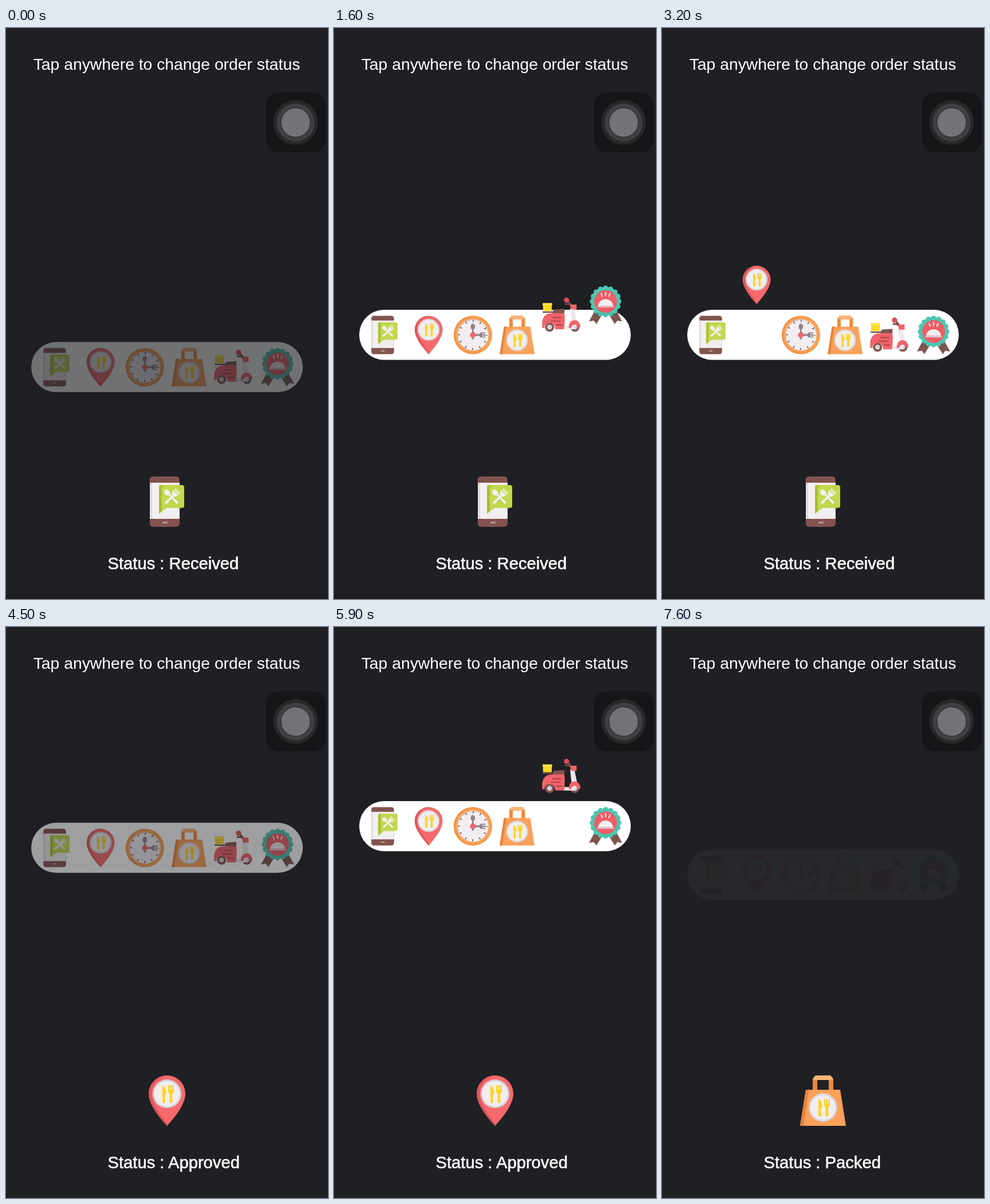
Write an HTML page that moves like this. It is 562 px wide and 997 px high and loops after 8 s.

```html
<!DOCTYPE html>
<html lang="en">
<head>
<meta charset="utf-8">
<title>Order status</title>
<style>
  html, body { margin: 0; height: 100%; overflow: hidden; background: #1f2024; }
  svg { display: block; width: 100vw; height: 100vh; }
  text { font-family: "Liberation Sans", Arial, sans-serif; fill: #fff; }
  #pill { filter: drop-shadow(0 8px 14px rgba(0, 0, 0, .05)); }
</style>
</head>
<body>
<svg viewBox="0 0 562 997" preserveAspectRatio="none">
  <defs>
    <g id="cutlery" fill="#fcd51c">
      <path d="M-8-15q7 4 6.500 16l-2.500 1 1 11q0 3-2.500 3t-2.500-3z"/>
      <path d="M2-15h2v8h1.500v-8h3v8H10v-8h2v10q0 4-3 5l.5 13q0 3-2.500 3t-2.500-3L5 0Q2-1 2-5z"/>
    </g>
    <g id="plate">
      <circle r="25" fill="#d9d5d9"/><circle r="22" fill="#f1edf0"/>
      <use href="#cutlery"/>
    </g>
    <g id="spoon"><ellipse cy="-12" rx="5" ry="7"/><path d="M-1.500-7h3l1 24h-5z"/></g>
    <g id="fork"><path d="M-6-18h2.500v8h2v-8h3v8h2v-8H6v9q0 4-4 5l.5 21h-5L-2-4q-4-1-4-5z"/></g>

    <g id="received">
      <rect x="14" width="52" height="88" rx="6" fill="#83544f"/>
      <path d="M14 11h52v63H14z" fill="#f3eeef"/><path d="M14 11h4v63h-4z" fill="#e2dcde"/>
      <path d="M33 5.500h1m6 0h1m6 0h1" stroke="#693f3d" stroke-width="2"/>
      <rect x="36" y="79" width="9" height="3" rx="1.500" fill="#b99791"/>
      <path d="M34 15h36q4 0 4 4v32q0 4-4 4H43L30 65V19q0-4 4-4z" fill="#c2d84e"/>
      <path d="M34 15q-4 0-4 4v46l5-4V19q0-3 3-4z" fill="#a5bf33"/>
      <g fill="#f3eff0">
        <use href="#spoon" transform="translate(52 36) rotate(-45) scale(.9)"/>
        <use href="#fork" transform="translate(52 36) rotate(45) scale(.9)"/>
      </g>
    </g>

    <g id="approved">
      <path d="M44 0C61 0 76 14 76 32c0 18-18 41-32 56C30 73 12 50 12 32 12 14 27 0 44 0z" fill="#f56a6c"/>
      <path d="M44 0C27 0 12 14 12 32c0 18 18 41 32 56l2-2C33 69 17 49 17 32 17 15 30 3 44 0z" fill="#e05659"/>
      <use href="#plate" x="44" y="32"/>
    </g>

    <g id="cooking">
      <circle cx="44" cy="44" r="44" fill="#ee8b3c"/>
      <circle cx="45" cy="44" r="42" fill="#fb9f50"/>
      <circle cx="44" cy="44" r="36" fill="#d8d3d7"/>
      <circle cx="45" cy="45" r="34.500" fill="#f1edf0"/>
      <circle cx="44" cy="44" r="32" fill="none" stroke="#5f4748" stroke-width="5"
        stroke-dasharray="2 14.755" stroke-dashoffset="1"/>
      <g fill="#8e8288">
        <use href="#spoon" transform="translate(44 37)"/>
        <use href="#fork" transform="translate(55 44) rotate(90)"/>
      </g>
      <circle cx="44" cy="44" r="6.500" fill="#f3666a"/>
    </g>

    <g id="packed">
      <path d="M26 26V6l5-6h26l5 6v20h-8V8H34v18z" fill="#f1883a"/>
      <path d="M31 0h26l5 6-5 2H31l-5-2z" fill="#fbb477"/>
      <path d="M14 25h60l10 63H4z" fill="#fba159"/>
      <path d="M14 25h5L10 88H4z" fill="#e9823b"/>
      <use href="#plate" x="44" y="56"/>
    </g>

    <g id="delivery">
      <path d="M2 17h20v18H2z" fill="#fbd927"/><path d="M1 17h22v5H1z" fill="#ffe34b"/>
      <path d="M1 36h28v3H1z" fill="#6e4947"/>
      <path d="M24 40l2-8 24-2q3 5 0 11z" fill="#835550"/>
      <g fill="#835550"><circle cx="17" cy="72" r="10.500"/><circle cx="75" cy="72" r="10.500"/></g>
      <g fill="#d9d3d7"><circle cx="17" cy="72" r="5.500"/><circle cx="75" cy="72" r="5.500"/></g>
      <path d="M64 29h10l7 34-9 14H50V69h13q6-4 4-14z" fill="#efe9ec"/>
      <path d="M0 74V60Q3 40 22 40h29q2 17-1 37H30Q29 62 17 62 6 62 5 74z" fill="#f1636a"/>
      <path d="M24 50h20M20 58h22M32 67h14" stroke="#a84149" stroke-width="2.500"/>
      <path d="M61 74q0-17 13-18 13 1 14 16l-5 2q-2-8-9-8-6 1-8 8z" fill="#f1636a"/>
      <path d="M55 11q9 2 9 12M52 19h15" fill="none" stroke="#6e4947" stroke-width="4"/>
      <path d="M64 20h15v12H66z" fill="#f1636a"/>
      <circle cx="56" cy="10" r="6" fill="#d84c57"/>
    </g>

    <g id="delivered">
      <path d="M20 56L6 82l11-2 6 8 14-23zM68 56l14 26-11-2-6 8-14-23z" fill="#7d5550"/>
      <g id="rosette" fill="#4cc5b1"><circle cx="44" cy="36" r="33"/></g>
      <circle cx="44" cy="36" r="26" fill="#ef5d66"/>
      <path d="M27 46a17 15 0 0 1 34 0z" fill="#f3eeef"/>
      <path d="M25 48h38" stroke="#d8d2d6" stroke-width="3"/>
      <path d="M34 18l2 6M44 15v7M54 18l-2 6" stroke="#f6eaec" stroke-width="3" stroke-linecap="round"/>
    </g>
  </defs>

  <path d="M0 996.500h562" stroke="#251820"/>
  <text x="280.500" y="72.500" font-size="28.300" text-anchor="middle">Tap anywhere to change order status</text>
  <rect x="453.500" y="112" width="105" height="105" rx="22" fill="#151618"/>
  <g transform="translate(505.500 165)">
    <circle r="39" fill="#27282a"/><circle r="33" fill="#404043"/>
    <circle r="25.700" fill="#757277" stroke="#2f2f32" stroke-width="1.500"/>
  </g>
  <use id="statusIcon" x="237" y="783"/>
  <text id="statusText" x="177.500" y="944.500" font-size="29.200" stroke="#fff" stroke-width=".6"></text>
  <g id="bar"><rect id="pill" x="44" width="474" height="87.500" rx="43.750" fill="#fff"/></g>
</svg>
<script>
const SVG = 'http://www.w3.org/2000/svg';
const LOOP = 8000, STEP = 100, TWEEN = 200, LIFT = 87.5;
const [RECEIVED, APPROVED, COOKING, PACKED, DELIVERY, DELIVERED] = [0, 1, 2, 3, 4, 5];
const names = ['received', 'approved', 'cooking', 'packed', 'delivery', 'delivered'];

// Each press opens the bar, slides over icons as [time, icon], then releases.
const presses = [
  { y: 492, open: -72, close: 3300, hovers: [
    [480, APPROVED], [680, COOKING], [866, PACKED], [1200, DELIVERY], [1480, DELIVERED],
    [1720, DELIVERY], [1920, PACKED], [2090, COOKING], [2266, APPROVED]] },
  { y: 304, open: 4386, close: 7407, hovers: [
    [4780, APPROVED], [5030, COOKING], [5300, PACKED], [5600, DELIVERY],
    [6180, PACKED], [6480, COOKING], [6753, PACKED]] },
];

const byId = id => document.getElementById(id);
const add = (parent, tag, attrs) => {
  const node = parent.appendChild(document.createElementNS(SVG, tag));
  for (const key in attrs) node.setAttribute(key, attrs[key]);
  return node;
};
const ramp = elapsed => Math.min(1, Math.max(0, elapsed / TWEEN));

for (let i = 0; i < 16; i++) {
  const angle = i * Math.PI / 8;
  add(byId('rosette'), 'circle', { cx: 44 + 30 * Math.cos(angle), cy: 36 + 30 * Math.sin(angle), r: 6.3 });
}

const bar = byId('bar'), statusIcon = byId('statusIcon'), statusText = byId('statusText');
const icons = names.map(name => add(bar, 'use', { href: '#' + name }));

function lift(press, icon, t) {
  return press.hovers.reduce((sum, [start, hovered], k) => {
    if (hovered !== icon) return sum;
    const end = k + 1 < press.hovers.length ? press.hovers[k + 1][0] : press.close;
    return sum + ramp(t - start) - ramp(t - end);
  }, 0);
}

function draw(t) {
  const press = presses[t < 4000 ? 0 : 1];
  const shown = ramp(t - press.open) - ramp(t - press.close);
  bar.setAttribute('opacity', shown);
  bar.setAttribute('transform', `translate(0 ${press.y + 88 * (1 - shown)})`);
  icons.forEach((node, i) => {
    const y = 10.5 - LIFT * lift(press, i, t);
    node.setAttribute('transform', `translate(${54.5 + 77.2 * i} ${y}) scale(.761)`);
  });

  const status = t < presses[0].close ? RECEIVED : t < presses[1].close ? APPROVED : PACKED;
  const name = names[status];
  statusIcon.setAttribute('href', '#' + name);
  statusText.textContent = 'Status : ' + name[0].toUpperCase() + name.slice(1);
}

function frame() {
  draw(Math.floor(performance.now() % LOOP / STEP) * STEP);
  requestAnimationFrame(frame);
}
frame();
</script>
</body>
</html>
```
